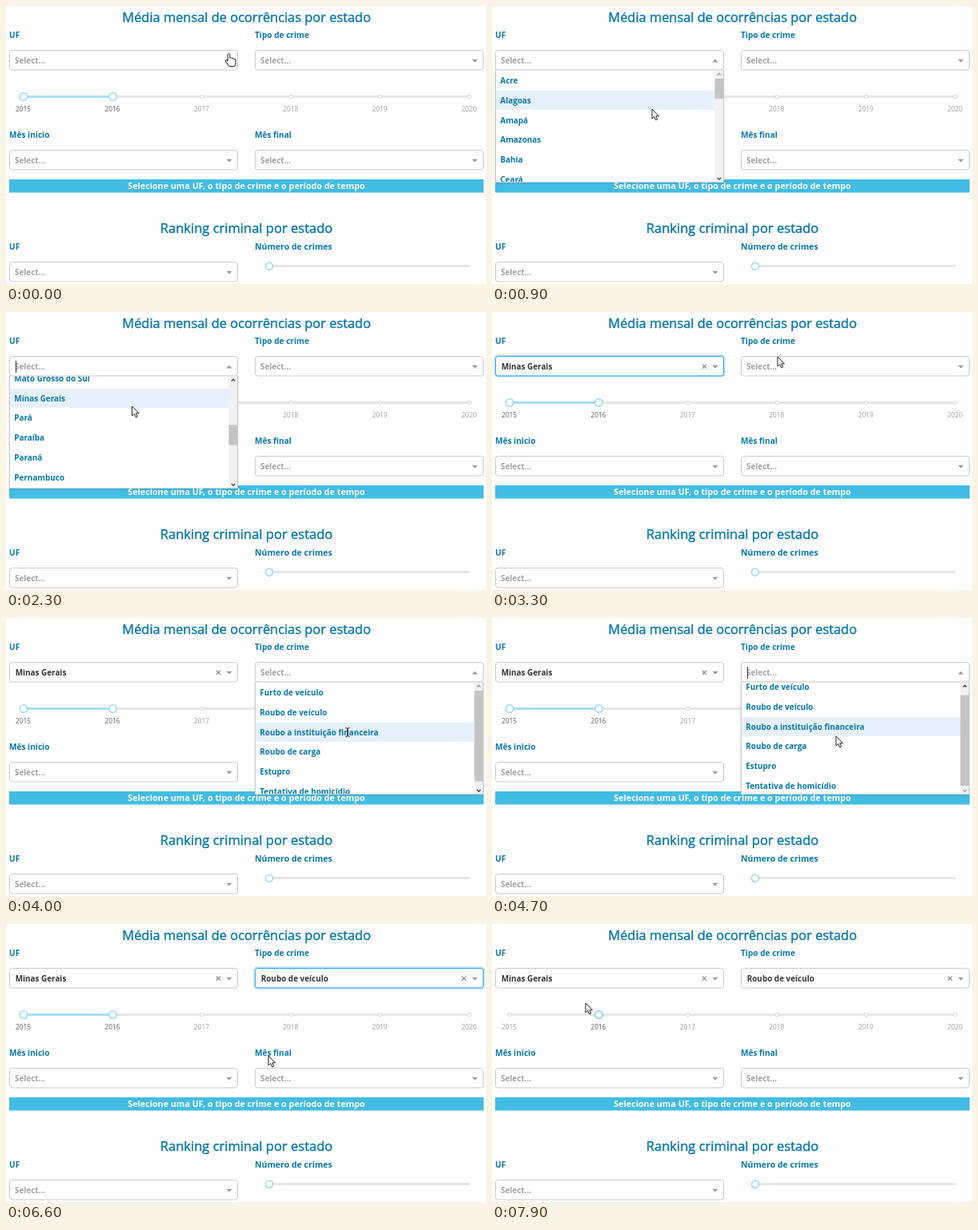
An HTML page with a canvas for the animation above (8000 ms loop, 600 by 348 pixels).

```html
<!DOCTYPE html>
<html lang="pt">
<head>
<meta charset="utf-8">
<title>Ocorrências por estado</title>
<style>
html, body { margin: 0; width: 100%; height: 100%; overflow: hidden; background: #fefefe; }
canvas { display: block; }
</style>
</head>
<body>
<canvas id="stage" width="600" height="348"></canvas>
<script>
const ctx = document.getElementById('stage').getContext('2d');
const LOOP = 8000, TICK = 100;
const FAMILY = '"Open Sans", "Noto Sans", sans-serif';
const BLUE = '#0878aa', TRACK = '#a5e0f7', RAIL = '#e6e6e8', PALE = '#a3a3a6';
const ROW = 24.75, MENU_TOP = 81, MENU_BOTTOM = 220.5, VIEW = 141.5;

const STATES = ['Acre', 'Alagoas', 'Amapá', 'Amazonas', 'Bahia', 'Ceará', 'Distrito Federal',
  'Espírito Santo', 'Goiás', 'Maranhão', 'Mato Grosso', 'Mato Grosso do Sul', 'Minas Gerais',
  'Pará', 'Paraíba', 'Paraná', 'Pernambuco', 'Piauí', 'Rio de Janeiro', 'Rio Grande do Norte',
  'Rio Grande do Sul', 'Rondônia', 'Roraima', 'Santa Catarina', 'São Paulo', 'Sergipe', 'Tocantins'];
const CRIMES = ['Furto de veículo', 'Roubo de veículo', 'Roubo a instituição financeira',
  'Roubo de carga', 'Estupro', 'Tentativa de homicídio'];

// Key times: each menu opens, then closes with a choice
const STATE_MENU = { x: 4, items: STATES, open: 300, close: 2800, choice: 12, blur: 3480 };
const CRIME_MENU = { x: 311, items: CRIMES, open: 3480, close: 5900, choice: 1, blur: 7500 };
const SNAP = 7700;

// [time, x, y]
const POINTER = [
  [0, 278.5, 59], [300, 278.5, 59], [500, 262, 78], [900, 200, 129], [1200, 190, 145],
  [1700, 183, 159], [1900, 180, 150], [2400, 152, 110], [2800, 150, 108], [3000, 215, 88],
  [3300, 357, 56], [3500, 418, 68], [3700, 424, 95], [4000, 427, 143], [4400, 430, 197],
  [4500, 430, 195], [4700, 430, 148], [4900, 429, 146], [5400, 422, 114], [5900, 422, 114],
  [6200, 390, 140], [6600, 328, 165], [6800, 320, 165], [7300, 22, 112], [7500, 22, 111],
  [7700, 80, 104], [7900, 117, 99], [8000, 117, 99]
];
const STATE_SCROLL = [[0, 0], [900, 0], [1100, 66], [1400, 190], [1700, 282.5], [LOOP, 282.5]];
const CRIME_SCROLL = [[0, 0], [4200, 0], [4500, 7], [LOOP, 7]];

function along(keys, t, k = 1) {
  const i = Math.max(1, keys.findIndex(key => key[0] >= t));
  const a = keys[i - 1], b = keys[i];
  const u = (t - a[0]) / (b[0] - a[0]);
  return a[k] + (b[k] - a[k]) * u;
}

function text(str, x, y, { size = 9.92, weight = 700, color = BLUE, align = 'left', embolden = 0 } = {}) {
  ctx.font = `${weight} ${size}px ${FAMILY}`;
  ctx.fillStyle = ctx.strokeStyle = color;
  ctx.textAlign = align;
  ctx.fillText(str, x, y);
  if (embolden) {
    ctx.lineWidth = embolden;
    ctx.strokeText(str, x, y);
  }
}

function rect(x, y, w, h, color) {
  ctx.fillStyle = color;
  ctx.fillRect(x, y, w, h);
}

function roundBox(x, y, w, h, r, stroke, width = 1) {
  ctx.beginPath();
  ctx.roundRect(x, y, w, h, r);
  ctx.strokeStyle = stroke;
  ctx.lineWidth = width;
  ctx.stroke();
}

function polyline(points, color, width) {
  ctx.beginPath();
  points.forEach(([x, y]) => ctx.lineTo(x, y));
  ctx.strokeStyle = color;
  ctx.lineWidth = width;
  ctx.stroke();
}

function circle(x, y, r, stroke, width) {
  ctx.beginPath();
  ctx.arc(x, y, r, 0, 7);
  ctx.fillStyle = '#fff';
  ctx.fill();
  ctx.strokeStyle = stroke;
  ctx.lineWidth = width;
  ctx.stroke();
}

function select(x, y, { value, open, focused, caret } = {}) {
  if (focused) roundBox(x - 0.5, y - 0.5, 287, 26, 3.5, 'rgba(0,136,230,.18)', 3);
  roundBox(x + 0.5, y + 0.5, 285, 24.5, 3, focused ? '#2aa3e2' : '#cbcbce');
  text(value || 'Select...', x + (value ? 7.7 : 7), y + 16.6, { color: value ? '#333' : PALE });
  if (caret) rect(x + 8, y + 6, 1, 15, '#333');
  if (value) {
    polyline([[x + 258.8, y + 10.6], [x + 264, y + 15.8]], '#8f8f8f', 1.3);
    polyline([[x + 264, y + 10.6], [x + 258.8, y + 15.8]], '#8f8f8f', 1.3);
  }
  const cx = x + 275, base = y + (open ? 15.4 : 11.7), tip = y + (open ? 11.7 : 15.4);
  ctx.beginPath();
  ctx.moveTo(cx - 3.6, base);
  ctx.lineTo(cx + 3.6, base);
  ctx.lineTo(cx, tip);
  ctx.fillStyle = '#999';
  ctx.fill();
}

function scrollbar(x, scroll, total) {
  const track = 119, on = '#505050', off = '#a8a8a8';
  rect(x, MENU_TOP, 11, MENU_BOTTOM - MENU_TOP, '#f1f1f1');
  rect(x, 91 + scroll / total * track, 11, VIEW / total * track, '#c4c4c4');
  const cx = x + 5.5;
  polyline([[cx - 2.3, 86.5], [cx, 84.2], [cx + 2.3, 86.5]], scroll > 0 ? on : off, 1.3);
  polyline([[cx - 2.3, 215], [cx, 217.3], [cx + 2.3, 215]], scroll < total - VIEW ? on : off, 1.3);
}

function menu({ x, items }, scroll, active) {
  ctx.save();
  ctx.shadowColor = 'rgba(0,0,0,.12)';
  ctx.shadowBlur = 3;
  ctx.shadowOffsetY = 1;
  rect(x, 80, 286, 141, '#c8c8cb');
  ctx.restore();
  rect(x + 1, MENU_TOP - 0.5, 284, MENU_BOTTOM - MENU_TOP + 0.2, '#fff');
  ctx.save();
  ctx.beginPath();
  ctx.rect(x + 1, MENU_TOP - 0.5, 284, MENU_BOTTOM - MENU_TOP);
  ctx.clip();
  items.forEach((item, i) => {
    const top = MENU_TOP + i * ROW - scroll;
    if (i === active) rect(x + 1, Math.round(top), 274, Math.floor(ROW), '#e6f1fc');
    text(item, x + 6.3, top + 16);
  });
  scrollbar(x + 274.5, scroll, items.length * ROW);
  ctx.restore();
}

function yearSlider(t) {
  const yearX = i => 22 + i * 111.45, y = 113.5;
  const moved = t >= SNAP, hover = t >= 7200;
  rect(22, y - 1.5, 557, 3, RAIL);
  if (!moved) rect(22, y - 1.5, 111, 3, TRACK);
  for (let i = 0; i < 6; i++) {
    circle(yearX(i), y, 2.2, '#dedee0', 1.2);
    const active = i === 1 || (i === 0 && !moved);
    text(2015 + i, yearX(i) - 0.5, 131.6,
      { size: 8.3, weight: 400, color: active ? '#606060' : '#a0a0a0', align: 'center' });
  }
  circle(yearX(1), y, 4.7, moved ? '#79cdf0' : '#97daf6', 1.6);
  if (!moved) circle(yearX(0), y, 4.7, hover ? '#79cdf0' : '#97daf6', 1.6);
}

const ARROW = new Path2D('M0 0V12L2.8 9.5L4.7 13.8L6.7 12.9L4.9 8.8H8.5Z');
const HAND = new Path2D('M-1.4 9V1.2Q0-.8 1.4 1.2V6Q3 5 4 6.6Q5.6 5.8 6.6 7.4Q8.4 6.8 8.6 8.6V12' +
  'Q8.6 14 7.4 16.5H.2L-3.6 11Q-5 8.6-3.4 8.4Q-2.4 8.4-1.4 10Z');
const IBEAM = new Path2D('M-2.5-5.5Q0-5.5 0-4V4Q0 5.5-2.5 5.5M2.5-5.5Q0-5.5 0-4V4Q0 5.5 2.5 5.5');

function pointer(t, x, y) {
  const hand = t < 400 || (t >= 7300 && t < 7600);
  const beam = t >= 3450 && t < 4200;
  ctx.save();
  ctx.translate(x, y);
  ctx.strokeStyle = '#222';
  ctx.lineWidth = 1;
  if (beam) {
    ctx.stroke(IBEAM);
  } else {
    const shape = hand ? HAND : ARROW;
    ctx.fillStyle = '#fff';
    ctx.fill(shape);
    ctx.stroke(shape);
  }
  ctx.restore();
}

function menuState(m, t) {
  const open = t >= m.open && t < m.close, chosen = t >= m.close;
  return {
    open,
    value: chosen ? m.items[m.choice] : '',
    focused: chosen && t < m.blur,
    caret: open && Math.floor((t - m.open) / 500) % 2 === 0
  };
}

function draw(t) {
  rect(0, 0, 600, 348, '#fefefe');
  const heading = { size: 16.4, weight: 400, align: 'center', embolden: 0.4 };
  const label = { size: 10.1 };
  text('Média mensal de ocorrências por estado', 300.7, 19.6, heading);
  text('UF', 4, 40, label);
  text('Tipo de crime', 311, 40, label);
  text('Mês inicio', 4, 165, label);
  text('Mês final', 311, 165, label);
  text('Ranking criminal por estado', 300.5, 284.2, { ...heading, size: 16.55 });
  text('UF', 4, 305, label);
  text('Número de crimes', 311, 305, { size: 10.55 });

  const state = menuState(STATE_MENU, t), crime = menuState(CRIME_MENU, t);
  select(4, 55, state);
  select(311, 55, crime);
  yearSlider(t);
  select(4, 180);
  select(311, 180);
  select(4, 320);

  rect(4, 217, 593, 16.5, '#43bce3');
  text('Selecione uma UF, o tipo de crime e o período de tempo', 300.5, 229.2,
    { size: 10.75, color: '#fff', align: 'center' });

  rect(324, 324, 255.5, 3, RAIL);
  circle(329, 325.7, 4.5, '#97daf6', 1.6);

  const x = along(POINTER, t, 1), y = along(POINTER, t, 2);
  const rowAt = scroll => Math.max(0, Math.floor((y + scroll - MENU_TOP) / ROW));
  if (state.open) {
    const scroll = along(STATE_SCROLL, t);
    // The wheel moves the list without updating the highlighted row
    menu(STATE_MENU, scroll, t > 900 && t < 1900 ? 1 : rowAt(scroll));
  }
  if (crime.open) {
    const scroll = along(CRIME_SCROLL, t);
    menu(CRIME_MENU, scroll, rowAt(scroll));
  }
  pointer(t, x, y);
}

function frame() {
  const t = performance.now() % LOOP;
  draw(Math.floor(t / TICK) * TICK);
  requestAnimationFrame(frame);
}
frame();
</script>
</body>
</html>
```
